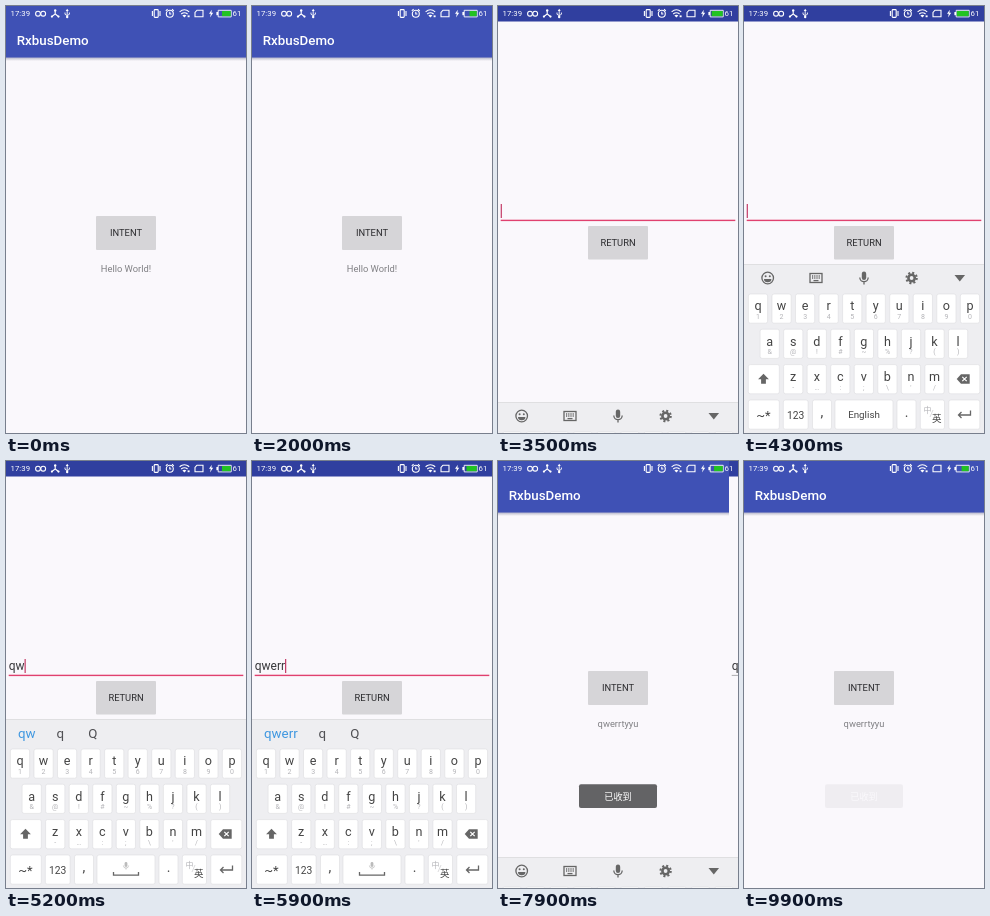
Animation of 240 by 427 pixels, one loop 10 s. Source, as an HTML page:

```html
<!DOCTYPE html>
<html lang="en">
<head>
<meta charset="utf-8">
<title>RxbusDemo</title>
<style>
html, body { margin: 0; width: 100%; height: 100%; overflow: hidden; background: #faf8fc; }
svg { display: block; width: 100%; height: 100%; font-family: Roboto, "Noto Sans CJK SC", "Noto Sans CJK", sans-serif; }
.mid { text-anchor: middle; }
.btn { fill: #d6d5d8; }
.label { font-size: 9.33px; fill: #2b2b2e; text-anchor: middle; }
.key { fill: #fff; stroke: #dcdce0; stroke-width: .6; }
.key.down { fill: #c9cace; }
.letter { font-size: 12.6px; fill: #444; text-anchor: middle; }
.sub { font-size: 7px; fill: #b4b4b8; text-anchor: middle; }
.line { fill: none; stroke: #666; stroke-width: 1.3; }
.white { fill: none; stroke: #fff; stroke-width: 1.1; }
</style>
</head>
<body>
<svg viewBox="0 0 240 427">
  <defs>
    <linearGradient id="shade" x2="0" y2="1">
      <stop offset="0" stop-color="#6f73a0" stop-opacity=".6"/>
      <stop offset="1" stop-color="#8a8a98" stop-opacity="0"/>
    </linearGradient>
  </defs>

  <g id="home">
    <rect width="240" height="427" fill="#faf8fc"/>
    <rect y="51" width="240" height="4" fill="url(#shade)"/>
    <rect width="240" height="51.5" fill="#3f51b5"/>
    <text x="10.7" y="38.5" font-size="13.33" font-weight="500" fill="#fff">RxbusDemo</text>
    <rect class="btn" x="90" y="210" width="60" height="34" rx="1"/>
    <text class="label" x="120" y="230.3">INTENT</text>
    <text id="result" class="mid" x="120" y="265.8" font-size="9.33" fill="#808084">Hello World!</text>
  </g>

  <g id="form">
    <rect width="240" height="427" fill="#faf8fc"/>
    <rect width="240" height="15.5" fill="#303f9f"/>
    <text id="entry" x="2.7" y="209.3" font-size="12" fill="#37373a"></text>
    <rect id="caret" y="198" width="1.2" height="14" fill="#c43b67"/>
    <rect id="rule" x="2.7" width="234.6"/>
    <rect class="btn" x="90" y="220" width="60" height="33.5" rx="1"/>
    <text class="label" x="120" y="240">RETURN</text>
  </g>

  <g id="board">
    <rect y="258" width="240" height="170" fill="#eeeef1"/>
    <rect y="258" width="240" height=".7" fill="#d8d8dc"/>
    <g id="tools">
      <g class="line">
        <circle cx="23.7" cy="272" r="5.8"/>
        <rect x="66" y="267.5" width="12" height="9"/>
        <path d="M68 270h8M68 272h8" stroke-dasharray="1.2 1"/>
        <path d="M69.5 274.6h5"/>
        <path d="M115.8 271.5a4.2 4.2 0 0 0 8.4 0M120 276v2.5"/>
        <circle cx="167.6" cy="272" r="3.2" stroke-width="2.6"/>
        <circle cx="167.6" cy="272" r="5.2" stroke-width="2" stroke-dasharray="2.04 2.04"/>
      </g>
      <g fill="#666">
        <circle cx="21.6" cy="270.3" r="1"/><circle cx="25.8" cy="270.3" r="1"/>
        <path d="M20 273h7.4a3.7 3.3 0 0 1 -7.4 0z"/>
        <rect x="117.8" y="265.5" width="4.4" height="8.5" rx="2.2"/>
        <path d="M210.5 269h10.6l-5.3 6.4z"/>
      </g>
    </g>
    <g id="picks">
      <rect id="pickBg" x="2" y="260" height="25" fill="#dcdce1"/>
      <text x="12" y="276.5" font-size="13.33" fill="#505054"><tspan id="word" fill="#3f97e0"></tspan><tspan dx="21">q</tspan><tspan dx="24">Q</tspan></text>
    </g>
    <g id="keys"></g>
    <path d="M19.5 367.8l5.4 5.4h-3v4.6h-4.8v-4.6h-3z" fill="#666"/>
    <path d="M217 368.3h8.7v9.4H217l-4.3-4.7z" fill="#666"/>
    <path d="M218.3 370.8l4.4 4.4m0-4.4l-4.4 4.4" stroke="#fff" stroke-width="1.2"/>
    <path class="line" d="M226.5 404.5v4.5h-12m3-3l-3 3l3 3"/>
    <text class="mid" x="19.5" y="413.5" font-size="13" fill="#444">~*</text>
    <text class="mid" x="51.6" y="412.5" font-size="10.3" fill="#444">123</text>
    <text class="mid" x="78" y="410.5" font-size="14" fill="#444">,</text>
    <text class="mid" x="162.5" y="410.5" font-size="14" fill="#444">.</text>
    <text x="179.5" y="407" font-size="8" fill="#b4b4b8">中</text>
    <path d="M186 411l3-7" stroke="#c4c4c8" stroke-width=".6"/>
    <text x="188" y="415.5" font-size="9.5" fill="#444">英</text>
    <text id="lang" class="mid" x="120" y="412" font-size="9.8" fill="#444">English</text>
    <g id="bar">
      <path class="line" d="M107.5 411v3.2h25V411" stroke-width="1.5"/>
      <rect x="118.6" y="401" width="2.8" height="5" rx="1.4" fill="#bbb"/>
      <path d="M117.4 404.5a2.6 2.6 0 0 0 5.2 0M120 407v1.6" fill="none" stroke="#bbb" stroke-width=".7"/>
    </g>
  </g>

  <g id="toast">
    <rect x="81" y="323.3" width="78" height="23.7" rx="2" fill="#636365"/>
    <text class="mid" x="120" y="338.8" font-size="9.2" font-weight="500" fill="#fff">已收到</text>
  </g>

  <g id="status">
    <g font-size="7.8" fill="#fff">
      <text x="4.6" y="10.4">17:39</text>
      <text x="226.6" y="10.4">61</text>
    </g>
    <g class="white">
      <circle cx="32" cy="7.7" r="2.4"/><circle cx="37.2" cy="7.7" r="2.4"/>
      <path d="M49.2 4v4l-3.6 2.8M49.2 8l3.6 2.8"/>
      <path d="M61.2 4v7.5M59 6.5v1.8l2.2 1.3l2.2-1.3V6.5" stroke-width=".9"/>
      <rect x="148.2" y="3.6" width="4" height="7.8" rx=".8"/>
      <path d="M146.4 5v5M154 5v5"/>
      <circle cx="163.8" cy="7.8" r="3.5"/>
      <path d="M163.8 5.8v2.2h1.6M159.8 4.8l1.8-1.6M167.8 4.8l-1.8-1.6"/>
      <path d="M173.6 5.8q4.8-4 9.6 0M175.2 8q3.2-2.6 6.4 0"/>
      <path d="M191 4.2h6v6.6h-8V6.4z"/>
      <path d="M212.2 4.3h13v6.6h-13z" stroke-width=".9"/>
    </g>
    <g fill="#fff">
      <circle cx="49.2" cy="4.4" r="1.2"/><circle cx="45.9" cy="10.6" r="1.1"/><circle cx="52.5" cy="10.6" r="1.1"/>
      <path d="M59.7 5l1.5-2.2L62.7 5z"/><circle cx="61.2" cy="11" r="1.2"/>
      <path d="M176.4 9.4q2-1.4 4 0l-2 2.2z"/><rect x="181.6" y="9.4" width="2" height="1.8"/>
      <path d="M205.8 3.8l-2.8 4h1.8l-.8 3.6l3.2-4.6h-1.8z"/>
      <rect x="210.4" y="6" width="1.6" height="3.2"/>
    </g>
    <rect id="charge" y="5" height="5.2" fill="#22c322"/>
  </g>
</svg>

<script>
const $ = id => document.getElementById(id);
const LOOP = 10000, STEP = 100;
const strokes = [['q', 4800], ['w', 5000], ['e', 5300], ['r', 5500], ['r', 5700],
                 ['t', 6000], ['y', 6100], ['y', 6300], ['u', 6400]];
const PICK = 6800, FOCUS = 3300, BACK = 7800;
const keyOf = {};

function add(tag, attrs, text) {
  const node = document.createElementNS('http://www.w3.org/2000/svg', tag);
  for (const name in attrs) node.setAttribute(name, attrs[name]);
  if (text) node.textContent = text;
  $('keys').append(node);
  return node;
}

const cap = (x, y, w) => add('rect', { class: 'key', x, y, width: w, height: 29.2, rx: 2 });

function row(letters, subs, x, y) {
  [...letters].forEach((ch, i) => {
    const cx = x + i * 23.55;
    keyOf[ch] = cap(cx - 9.6, y, 19.2);
    add('text', { class: 'letter', x: cx, y: y + 16.3 }, ch);
    add('text', { class: 'sub', x: cx, y: y + 25.2 }, subs[i]);
  });
}

row('qwertyuiop', '1234567890', 14, 288);
row('asdfghjkl', '&@!#~%?()', 25.7, 323.2);
row('zxcvbnm', "-…:;\\'/", 49.2, 358.6);
cap(4.3, 358.6, 31); cap(204.8, 358.6, 31);
[[4.3, 31], [39.3, 24.8], [68.5, 19], [91, 58], [153, 19], [176.3, 24.2], [204.8, 31]]
  .forEach(([x, w]) => cap(x, 394, w));

const show = (id, on) => $(id).style.display = on ? '' : 'none';
const move = (id, x, y) => $(id).setAttribute('transform', `translate(${x} ${y})`);

// Second screen: slides in from the right, later back out
function formX(t) {
  if (t < 2300 || t > 8000) return 240;
  if (t < BACK) return Math.round(240 * Math.exp((2200 - t) / 61));
  return Math.round(240 * (1 - Math.exp((7700 - t) / 61)));
}

function boardY(t) {
  if (t < 3500 || t >= 8000) return 170;
  if (t < 4000) return 169 * ((4000 - t) / 600) ** 1.1;
  return t < BACK ? 0 : 169 * Math.sqrt((t - 7700) / 300);
}

function draw(t) {
  const typed = strokes.filter(s => t >= s[1]);
  const word = typed.map(s => s[0]).join('');
  const focus = t >= FOCUS && t < BACK;

  move('form', formX(t), 0);
  move('board', 0, Math.round(boardY(t)));
  $('result').textContent = t < BACK ? 'Hello World!' : word;

  $('entry').textContent = word;
  const edit = t >= PICK ? PICK : typed.length ? typed[typed.length - 1][1] : FOCUS;
  const end = word ? $('entry').getComputedTextLength() : 0;
  $('caret').setAttribute('x', 2.7 + end + (t >= PICK ? 3 : 0));
  show('caret', focus && (t - edit) % 1000 < 500);
  $('rule').setAttribute('fill', focus ? '#e0416f' : '#98989c');
  $('rule').setAttribute('y', focus ? 213.7 : 213.9);
  $('rule').setAttribute('height', focus ? 1.4 : .8);

  const picking = word && t < PICK + 200;
  show('tools', !picking);
  show('picks', picking);
  show('lang', !word);
  show('bar', word);
  $('word').textContent = word;
  show('pickBg', t >= PICK);
  if (picking) $('pickBg').setAttribute('width', 20 + $('word').getComputedTextLength());

  for (const ch in keyOf) {
    const down = strokes.some(s => s[0] === ch && t >= s[1] && t < s[1] + 200);
    keyOf[ch].classList.toggle('down', down);
  }

  const fade = Math.min(1, Math.max(0, (9920 - t) / 300));
  $('toast').setAttribute('opacity', t < BACK ? 0 : fade);

  const left = [217.6, 216, 214.5, 213.7, 212.8][Math.floor((t + 500) / 500) % 5];
  $('charge').setAttribute('x', left);
  $('charge').setAttribute('width', 224.7 - left);
}

const start = performance.now();
function tick() {
  const t = (performance.now() - start) % LOOP;
  draw(Math.floor(t / STEP) * STEP);
  requestAnimationFrame(tick);
}
tick();
</script>
</body>
</html>
```
